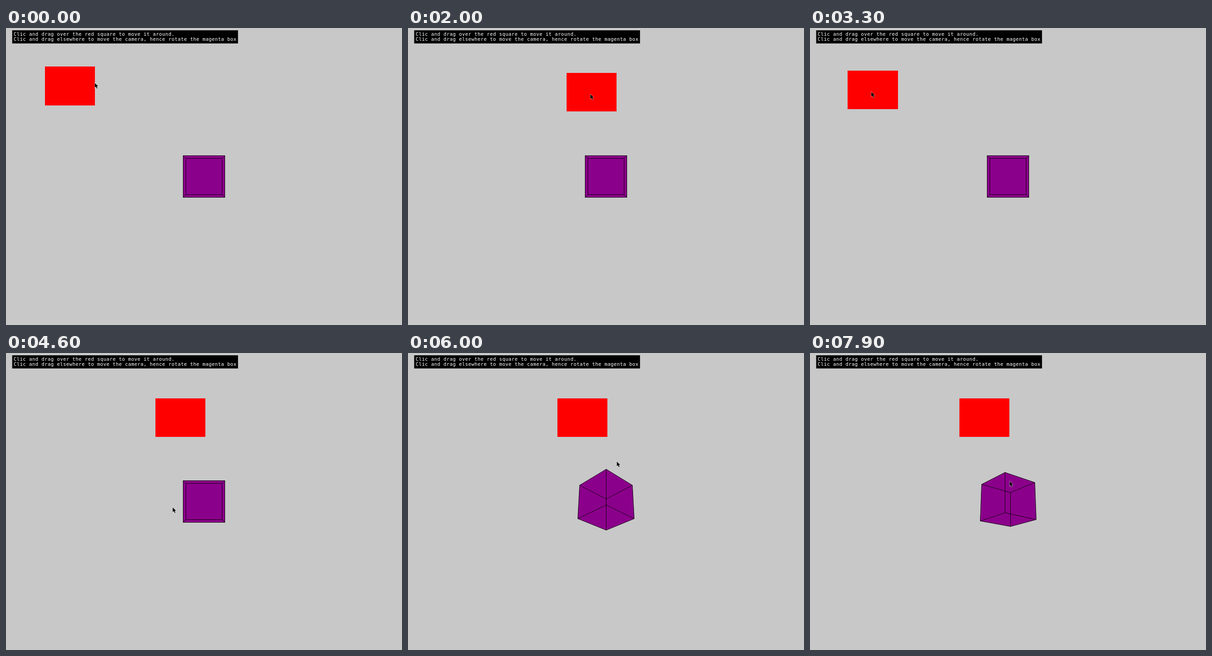
These frames come from a looping animation (864 by 648 pixels, 8000 ms). An HTML page with a canvas:

```html
<!DOCTYPE html>
<html lang="en">
<head>
<meta charset="utf-8">
<title>Drag and orbit</title>
<style>
html, body { margin: 0; width: 100%; height: 100%; overflow: hidden; background: #c8c8c8; }
canvas { display: block; }
</style>
</head>
<body>
<canvas id="stage" width="864" height="648"></canvas>
<script>
const ctx = document.getElementById('stage').getContext('2d');
const LOOP = 8000, STEP = 100;
const SIZE = 84.375, DIST = 561.2;       // box side, camera distance (also focal length)
const GRAB = [1200, 3800], ORBIT = 4900; // when the square and the camera are dragged

// turning points of the pointer: time, x, y
const path = [
  [0, 193, 119], [1000, 136, 130], [1250, 136, 130],
  [2000, 397, 143.5], [2400, 474, 145], [2500, 474, 145], [3200, 110, 138], [3750, 377, 144.5],
  [3900, 377, 144.5], [4200, 387, 190], [4600, 363, 336], [4900, 291, 344], [5000, 291, 344],
  [5300, 181, 375], [5500, 228, 420], [6000, 455, 236], [6150, 610, 184], [6300, 745, 225],
  [6700, 287, 380], [6900, 338, 379], [7200, 376, 427], [7600, 450, 271], [7900, 435, 279]
];

function slope(i, k) {
  const a = path[i - 1], b = path[i], c = path[i + 1];
  if (!a || !c || (b[k] - a[k]) * (c[k] - b[k]) <= 0) return 0;
  return (c[k] - a[k]) / (c[0] - a[0]);
}

// smooth path without overshoot
function pointer(t) {
  const i = path.findLastIndex(p => p[0] <= t);
  const a = path[i], b = path[i + 1];
  if (!b) return a.slice(1);
  const span = b[0] - a[0], u = (t - a[0]) / span, v = 1 - u;
  return [1, 2].map(k =>
    v * v * ((1 + 2 * u) * a[k] + u * span * slope(i, k)) +
    u * u * ((3 - 2 * u) * b[k] - v * span * slope(i + 1, k)));
}

function polygon(points) {
  ctx.beginPath();
  points.forEach(p => ctx.lineTo(...p));
  ctx.closePath();
}

function drawSquare(t) {
  const [x, y] = pointer(Math.min(Math.max(t, GRAB[0]), GRAB[1]));
  const [left, top, right, bottom] =
    [x - 51.4, y - 45.6, x + 58.3, y + 38.7].map(Math.round);
  ctx.fillStyle = '#f00';
  ctx.fillRect(left, top, right - left, bottom - top);
}

const pixel = v => Math.floor(v) + 0.5;

function corner(i, yaw, pitch) {
  const [x, y, z] = [1, 2, 4].map(bit => i & bit ? SIZE / 2 : -SIZE / 2);
  const side = x * Math.cos(yaw) + z * Math.sin(yaw);
  const depth = z * Math.cos(yaw) - x * Math.sin(yaw);
  const up = y * Math.cos(pitch) - depth * Math.sin(pitch);
  const near = depth * Math.cos(pitch) + y * Math.sin(pitch);
  const scale = DIST / (DIST - near);
  return [pixel(432 + side * scale), pixel(324 - up * scale)];
}

function drawBox(yaw, pitch) {
  const corners = [...Array(8).keys()].map(i => corner(i, yaw, pitch));
  const edges = new Path2D();
  ctx.fillStyle = '#8b008b';
  for (const [a, b, c] of [[1, 2, 4], [2, 4, 1], [4, 1, 2]]) {
    for (const side of [0, c]) {
      polygon([0, a, a | b, b].map(i => corners[i | side]));
      ctx.fill();
    }
    for (const i of [0, a, a | b, b]) {
      edges.moveTo(...corners[i]);
      edges.lineTo(...corners[i | c]);
    }
  }
  ctx.strokeStyle = '#000';
  ctx.lineWidth = 0.9;
  ctx.stroke(edges);
}

function drawText() {
  ctx.fillStyle = '#000';
  ctx.fillRect(13.5, 5, 492.7, 28.7);
  ctx.fillStyle = '#fff';
  ctx.font = '10.5px "DejaVu Sans Mono", monospace';
  ctx.letterSpacing = '0.43px';
  ctx.fillText('Clic and drag over the red square to move it around.', 16.8, 17);
  ctx.fillText('Clic and drag elsewhere to move the camera, hence rotate the magenta box', 16.8, 28);
}

function drawPointer(x, y) {
  polygon([[0, 0], [0, 10.2], [2.4, 8.1], [4.3, 12.2], [6, 11.4], [4.2, 7.5], [7.2, 7.2]]
    .map(p => [x + 0.7 + p[0], y + 0.9 + p[1]]));
  ctx.strokeStyle = 'rgba(255,255,255,.6)';
  ctx.lineWidth = 1.2;
  ctx.stroke();
  ctx.fillStyle = '#000';
  ctx.fill();
}

function draw(now) {
  const t = Math.floor(now % LOOP / STEP) * STEP;
  const [x, y] = pointer(t);
  const turn = t < ORBIT ? 0 : Math.PI / 648;
  ctx.fillStyle = '#c8c8c8';
  ctx.fillRect(0, 0, 864, 648);
  drawSquare(t);
  drawBox((x - 293) * turn, (y - 344) * turn);
  drawText();
  drawPointer(x, y);
}

const start = performance.now();
function tick() {
  draw(performance.now() - start);
  requestAnimationFrame(tick);
}
tick();
</script>
</body>
</html>
```
